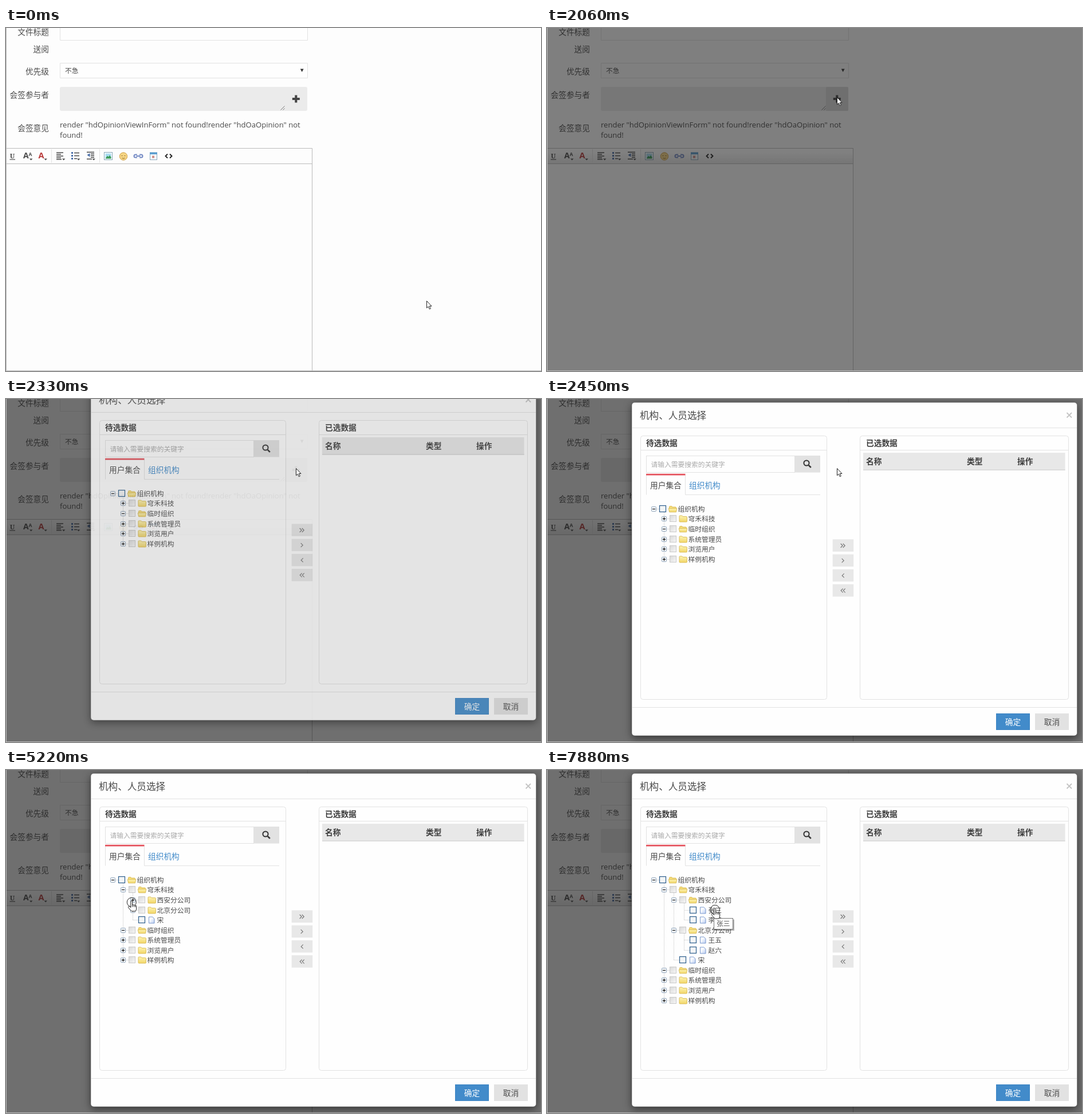
An HTML page that plays this animation: 934 by 600 pixels, repeating every 8000 ms.

```html
<!DOCTYPE html>
<html lang="zh-CN">
<head>
<meta charset="utf-8">
<title>机构、人员选择</title>
<style>
html, body { margin: 0; width: 100%; height: 100%; overflow: hidden; background: #fdfdfd; }
svg { display: block; width: 934px; height: 600px; }
text { font-family: "Open Sans", "Noto Sans CJK SC", "Noto Sans CJK", sans-serif; font-size: 13.7px; fill: #4a4a4a; }
.cjk text, text.cjk { font-family: "Noto Sans CJK SC", "Noto Sans CJK", sans-serif; }
.sm { font-size: 11.75px; }
.lg { font-size: 16.6px; }
.code { font-size: 13.07px; }
.b { font-weight: 700; fill: #3c3c3c; }
.end { text-anchor: end; }
.mid { text-anchor: middle; }
.ln { fill: none; stroke: #e2e2e2; }
.edge { fill: none; stroke: #bbb; }
.box { fill: #fefefe; stroke: #e2e2e2; }
.ic { fill: none; stroke: #4a4a4a; stroke-width: 1.5; }

.t { animation: 8s step-end infinite; }
#hover { animation-name: hover; }
#veil { animation-name: veil; }
#modal { animation-name: modal; }
#cursor { animation-name: move; }
#ring { animation-name: ring; }
#arrow { animation-name: until-hand; }
#hand { animation-name: from-hand; }
#tip { animation-name: tip; }
#s0 { animation-name: s0; }
#s1 { animation-name: s1; }
#s2 { animation-name: s2; }
#s3 { animation-name: s3; }

@keyframes hover { 0% { opacity: 0 } 23.875% { opacity: .25 } 25.75%, 100% { opacity: 1 } }
@keyframes veil { 0% { opacity: 0 } 25.75% { opacity: .556 } 27.625%, 100% { opacity: .627 } }
@keyframes modal {
  0% { opacity: 0; transform: translate(0, -146px) }
  27.625% { opacity: .1; transform: translate(0, -120px) }
  29.125% { opacity: .82; transform: translate(0, -27px) }
  30.625%, 100% { opacity: 1; transform: none }
}
@keyframes move {
  0% { transform: translate(734px, 477px) }
  6.5% { transform: translate(725px, 463px) }
  8.25% { transform: translate(698px, 420px) }
  10% { transform: translate(662px, 363px) }
  11.75% { transform: translate(621px, 299px) }
  13.5% { transform: translate(580px, 235px) }
  15.125% { transform: translate(544px, 178px) }
  16.875% { transform: translate(517px, 135px) }
  18.5% { transform: translate(508px, 121px) }
  20.375% { transform: translate(506px, 121px) }
  38% { transform: translate(478px, 132px) }
  39.875% { transform: translate(396px, 162px) }
  41.375% { transform: translate(300px, 194px) }
  43.25% { transform: translate(225px, 215px) }
  44.75% { transform: translate(198px, 221px) }
  47.875% { transform: translate(201px, 214px) }
  49.75% { transform: translate(203px, 210px) }
  56.5% { transform: translate(205px, 213px) }
  58.25% { transform: translate(209px, 218px) }
  60.125% { transform: translate(213px, 224px) }
  61.875% { transform: translate(217px, 229px) }
  63.75% { transform: translate(219px, 231px) }
  70.5% { transform: translate(219px, 238px) }
  72.25% { transform: translate(220px, 251px) }
  73.875% { transform: translate(220px, 265px) }
  75.625% { transform: translate(221px, 276px) }
  77.25% { transform: translate(221px, 280px) }
  84% { transform: translate(243px, 269px) }
  85.625% { transform: translate(276px, 252px) }
  87.25%, 100% { transform: translate(293px, 244px) }
}
@keyframes ring {
  0%, 23.875%, 54.75%, 68.75%, 82.375% { visibility: hidden }
  20.375%, 51.25%, 65.25%, 78.875%, 98.5%, 100% { visibility: visible }
}
@keyframes until-hand { 0% { visibility: visible } 44.75%, 100% { visibility: hidden } }
@keyframes from-hand { 0% { visibility: hidden } 44.75%, 100% { visibility: visible } }
@keyframes tip { 0% { opacity: 0 } 91.125% { opacity: .5 } 93%, 100% { opacity: 1 } }
@keyframes s0 { 0% { visibility: visible } 54.75%, 100% { visibility: hidden } }
@keyframes s1 { 0%, 68.75%, 100% { visibility: hidden } 54.75% { visibility: visible } }
@keyframes s2 { 0%, 82.375%, 100% { visibility: hidden } 68.75% { visibility: visible } }
@keyframes s3 { 0% { visibility: hidden } 82.375%, 100% { visibility: visible } }
</style>
</head>
<body>
<svg viewBox="0 0 934 600">
  <defs>
    <linearGradient id="bar" x2="0" y2="1"><stop offset=".3" stop-color="#fff"/><stop offset="1" stop-color="#e9e9e9"/></linearGradient>
    <linearGradient id="off" x2="1" y2="1"><stop stop-color="#d9d9d9"/><stop offset="1" stop-color="#f7f7f7"/></linearGradient>
    <linearGradient id="gold" x2="0" y2="1"><stop stop-color="#fdf4b4"/><stop offset="1" stop-color="#f2d668"/></linearGradient>
    <linearGradient id="page" x2="1" y2="1"><stop offset=".3" stop-color="#fff"/><stop offset="1" stop-color="#b9cdf2"/></linearGradient>
    <path id="caret" d="M0 0h5.4l-2.7 3z" fill="#4a4a4a"/>
    <g id="closed"><path d="M-6.5-4.5q0-1 1-1h3.8l1.4 1.6h6.2q1 0 1 1v7.4q0 1-1 1h-11.4q-1 0-1-1z" fill="url(#gold)" stroke="#d8b84e" stroke-width=".9"/></g>
    <g id="open"><path d="M-6-4q0-1 1-1h3.4l1.4 1.5h5q1 0 1 1v6h-11.8z" fill="#f5dd7c" stroke="#d8b84e" stroke-width=".9"/>
      <path d="M-7.2-1.2h14.4l-1.2 6.5h-11.8z" fill="url(#gold)" stroke="#d8b84e" stroke-width=".9"/></g>
    <path id="user" d="M-5-5.5h6.3l3.2 3.2v7.8h-9.5z" fill="url(#page)" stroke="#6f8fc9" stroke-width=".9"/>
  </defs>
  <rect width="934" height="600" fill="#fdfdfd"/>

  <g class="cjk end">
    <text x="75" y="12">文件标题</text>
    <text x="75" y="42">送阅</text>
    <text x="75" y="80.5">优先级</text>
    <text x="75" y="122">会签参与者</text>
    <text x="75" y="180">会签意见</text>
  </g>
  <path class="box" d="M94.5-2V21.5H526.5V-2M94.5 61.5h432v26h-432z"/>
  <text class="sm cjk" x="103" y="79.3">不急</text>
  <path d="M513.8 71.5h5.8l-2.9 5.5z" fill="#333"/>
  <rect x="94" y="103" width="432" height="42" rx="3" fill="#ebebeb"/>
  <path d="M479.5 143.5l7-7M483.5 143.5l3-3" stroke="#777" fill="none"/>
  <text class="code" x="94" y="174">render "hdOpinionViewInForm" not found!render "hdOaOpinion" not</text>
  <text class="code" x="94" y="192">found!</text>

  <g id="hover" class="t">
    <rect x="487" y="103" width="39" height="42" rx="2" fill="#d9d9d9"/>
    <rect x="1" y="211" width="533" height="26" fill="url(#bar)"/>
  </g>
  <path d="M506.3 117.5v13M499.8 124h13" stroke="#444" stroke-width="4"/>

  <path class="edge" d="M0 210.5H534.5V600M0 237.5H534"/>
  <path class="ln" d="M79.5 212v24M163.5 212v24"/>
  <g id="tools">
    <text class="mid" style="font:700 11.5px 'Noto Serif',serif" x="11" y="228">U</text>
    <path class="ic" d="M6.5 230h9.5" style="stroke-width:1.2"/>
    <text style="font:700 14px 'Open Sans',sans-serif" x="30" y="228">A</text>
    <text style="font:700 8.5px 'Open Sans',sans-serif" x="39.5" y="223.5">A</text>
    <text style="font:700 14.5px 'Open Sans',sans-serif;fill:#b93a3a" x="56.5" y="228">A</text>
    <use href="#caret" x="41" y="228.5"/><use href="#caret" x="66.5" y="228.5"/>
    <use href="#caret" x="98" y="228.5"/><use href="#caret" x="124" y="228.5"/><use href="#caret" x="150.5" y="228.5"/>
    <path class="ic" d="M88 218h12M88 221h8M88 224h12M88 227h8M88 229.8h9M119 218.5h9M119 223.5h9M119 228.5h5M141 217.3h13M148 220.3h6M148 223.3h6M148 226.3h6M141 229.3h9"/>
    <path d="M114 217h3v3h-3zM114 222h3v3h-3zM114 227h3v3h-3zM146.5 219v6.5l-5-3.2z" fill="#4a6ea8"/>
    <rect x="171.5" y="217.5" width="14" height="13" fill="#fff" stroke="#85a5b8"/>
    <rect x="173.5" y="219.5" width="10" height="9" fill="#a9dcf2"/>
    <path d="M173.5 228.5l3.5-5 2 2 2-3 2.5 3.5v2.5z" fill="#3c9b57"/>
    <circle cx="205" cy="224.5" r="6.7" fill="#f6d583" stroke="#cfa04a"/>
    <path d="M201.5 223.5h2M206.5 223.5h2M202.5 227.5q2.5 1.5 5 0" stroke="#8d6526" fill="none"/>
    <path d="M229 221.5h-3a2.5 2.5 0 0 0 0 5h3M233 221.5h3a2.5 2.5 0 0 1 0 5h-3M227.5 224h7" fill="none" stroke="#7389c4" stroke-width="2"/>
    <rect x="251.5" y="218" width="12" height="12.5" fill="#f5f9fc" stroke="#8ba9bd"/>
    <path d="M251 217.5h13v3.5h-13z" fill="#5c9fd0"/>
    <path d="M255 223.5h4v4h-4z" fill="#cf8d86"/>
    <path class="ic" d="M282 220.5l-3.5 3.5 3.5 3.5M286 220.5l3.5 3.5-3.5 3.5" style="stroke:#222;stroke-width:1.9"/>
  </g>

  <rect id="veil" class="t" x="1" width="933" height="599" fill="#1c1c1c"/>
  <path class="edge" d="M.5 0V599.5H934"/>

  <g id="modal" class="t cjk">
    <rect x="148" y="6" width="777.5" height="583" rx="5" fill="#fefefe" stroke="#555" stroke-opacity=".5" style="filter:drop-shadow(0 4px 7px rgba(0,0,0,.5))"/>
    <text class="lg" x="162" y="34.5">机构、人员选择</text>
    <path d="M907.5 24l8.5 8.5M916 24l-8.5 8.5" stroke="#c4c4c4" stroke-width="1.8"/>
    <path class="ln" d="M149 50.5H925M149 539.5H925"/>
    <rect class="box" x="163.5" y="64.5" width="325" height="461" rx="4"/>
    <rect class="box" x="546.5" y="64.5" width="364" height="461" rx="4"/>
    <path class="ln" d="M164 89.5H488M547 89.5H910"/>
    <text class="b" x="173" y="82">待选数据</text>
    <text class="b" x="557" y="82">已选数据</text>
    <rect x="552" y="94" width="352.5" height="31" fill="#e8e8e8"/>
    <path d="M552 124h352.5" stroke="#dcdcdc" stroke-width="2"/>
    <text class="b" x="557" y="114">名称</text>
    <text class="b" x="733" y="114">类型</text>
    <text class="b" x="821" y="114">操作</text>
    <rect class="box" x="173.5" y="99.5" width="259" height="29"/>
    <text class="sm" style="fill:#aaa" x="181.5" y="118.5">请输入需要搜索的关键字</text>
    <rect x="432" y="99" width="45" height="29.5" fill="#e2e2e2"/>
    <path d="M456.8 115.8l4 4" stroke="#333" stroke-width="2.6"/>
    <circle cx="453" cy="112" r="4.6" fill="none" stroke="#333" stroke-width="2"/>
    <path class="ln" d="M173.5 133V167.5M241.5 133V167.5H477"/>
    <path d="M173 132.2h68.5" stroke="#e4515b" stroke-width="2.7"/>
    <text x="180" y="156">用户集合</text>
    <text style="fill:#428bca" x="248" y="156">组织机构</text>
    <g id="shift"></g>
    <rect x="784.5" y="550.5" width="58" height="28" fill="#428bca" stroke="#3c84c3"/>
    <text class="mid" style="fill:#fff" x="813.5" y="570">确定</text>
    <rect x="852" y="550" width="59" height="29" fill="#e2e2e2"/>
    <text class="mid" x="881.5" y="570">取消</text>
    <g id="tree"></g>
  </g>

  <g id="tip" class="t cjk">
    <rect x="293.5" y="261.5" width="33.5" height="19.5" fill="#000" opacity=".3"/>
    <rect x="291.5" y="259.5" width="33" height="19" fill="#fff" stroke="#777"/>
    <text class="sm" style="fill:#555" x="296" y="273.3">张三</text>
  </g>

  <g id="cursor" class="t">
    <circle id="ring" class="t" cx=".3" cy=".3" r="8" fill="none" stroke="#222"/>
    <path id="arrow" class="t" d="M.5.5V12.8L3.3 10.3 5.3 14.8 7.3 13.9 5.3 9.5H9z" fill="#fff" stroke="#222"/>
    <path id="hand" class="t" d="M-1.2 9.5V-.5q0-1.5 1.4-1.5t1.4 1.5V5q1.5-1 2.6.3 1.6-.8 2.5.6 2-.3 2 1.6V11q0 3-1.8 5H.3Q-3 13-5.4 9.6-6 7.8-4.4 7.4-2.7 7.6-1.2 9.5zM1.6 5v3.5M4.2 5.5v3M6.7 6v3" fill="#fff" stroke="#222"/>
  </g>
</svg>
<script>
const STEP = 17.55;

// level, kind (+ closed, - open, u user), label
const root = [0, '-', '组织机构'];
const firm = k => [1, k, '穹禾科技'];
const west = k => [2, k, '西安分公司'];
const north = k => [2, k, '北京分公司'];
const user = (level, name) => [level, 'u', name];
const rest = [[1, '-', '临时组织'], [1, '+', '系统管理员'], [1, '+', '浏览用户'], [1, '+', '样例机构']];
const westUsers = [user(3, '张三'), user(3, '李四')];
const northUsers = [user(3, '王五'), user(3, '赵六')];
const song = user(2, '宋');

const states = [
  [root, firm('+'), ...rest],
  [root, firm('-'), west('+'), north('+'), song, ...rest],
  [root, firm('-'), west('-'), ...westUsers, north('+'), song, ...rest],
  [root, firm('-'), west('-'), ...westUsers, north('-'), ...northUsers, song, ...rest]
];

const rowY = i => 191.9 + i * STEP;

function links(rows, i) {
  const level = rows[i][0], x = Math.round(186 + level * STEP) + .5, y = Math.round(rowY(i)) + .5;
  let p = i;
  while (p > 0 && rows[p][0] >= level) p--;
  const up = level ? `M${x} ${Math.round(rowY(p)) + 6}V${y}` : '';
  return `<path d="${up}M${x} ${y}h10" fill="none" stroke="#c4c4c4" stroke-dasharray="1 1"/>`;
}

function row([level, kind, label], i) {
  const x = Math.round(186 + level * STEP), y = Math.round(rowY(i));
  const leaf = kind === 'u', live = leaf || !level;
  const icon = leaf ? 'user' : kind === '+' ? 'closed' : 'open';
  const plus = kind === '+' ? 'M0-2.5v5' : '';
  const toggle = leaf ? '' : `<rect x="-4" y="-4" width="8" height="8" rx="1" fill="#f4f7fa" stroke="#8fa3b8"/>
    <path d="M-2.5 0h5${plus}" stroke="#222" stroke-width="1.3"/>`;
  return `<g transform="translate(${x + .5} ${y + .5})">${toggle}
    <rect x="10" y="-6" width="11" height="11" fill="${live ? '#f3f5f6' : 'url(#off)'}" stroke="${live ? '#2c5d8c' : '#c9c9c9'}" stroke-width="${live ? 1.2 : 1}"/>
    <use href="#${icon}" x="33" y="0"/>
    <text class="sm" x="42" y="4">${label}</text></g>`;
}

document.getElementById('tree').innerHTML = states.map((rows, n) =>
  `<g id="s${n}" class="t">${rows.map((r, i) => links(rows, i)).join('')}${rows.map(row).join('')}</g>`).join('');

const right = x => `M${x - 2} -3.5l3.5 3.5-3.5 3.5`;
const left = x => `M${x + 2} -3.5l-3.5 3.5 3.5 3.5`;
document.getElementById('shift').innerHTML = [right(-2) + right(2), right(0), left(0), left(-2) + left(2)]
  .map((d, i) => `<g transform="translate(516.7 ${256.5 + i * 26.2})">
    <rect x="-18" y="-11" width="36.5" height="21.5" fill="#e8e8e8"/>
    <path d="${d}" fill="none" stroke="#777" stroke-width="1.2"/></g>`).join('');
</script>
</body>
</html>
```
